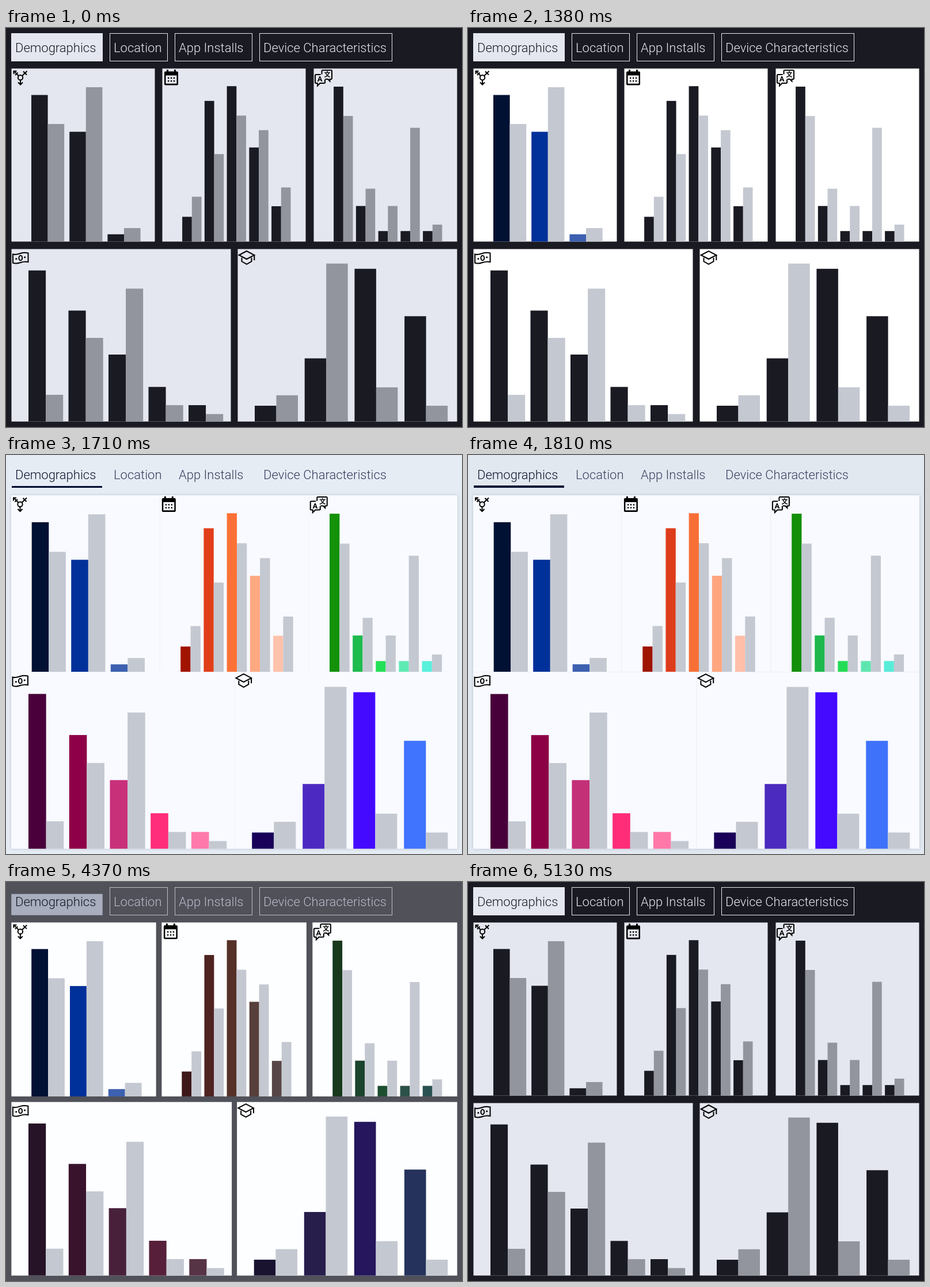
An HTML page with a canvas for the animation above (5.37 s loop, 792 px wide and 694 px high).

```html
<!DOCTYPE html>
<html lang="en">
<head>
<meta charset="utf-8">
<title>Dashboard themes</title>
<style>
  html, body { margin: 0; width: 100%; height: 100%; overflow: hidden; background: #1a1a22; }
  canvas { display: block; }
</style>
</head>
<body>
<canvas id="stage" width="792" height="694"></canvas>
<script>
const ctx = document.getElementById('stage').getContext('2d');
const LOOP = 5370;
const WIRE = 0, DRAFT = 1, FINAL = 2;

// Each change: first visible time, curve start, curve end, from, to
const CHANGES = [
  [170, 170, 590, WIRE, DRAFT],
  [1380, 1380, 1810, DRAFT, FINAL],
  [4180, 4075, 4510, FINAL, DRAFT],
  [4800, 4695, 5130, DRAFT, WIRE],
];

const INK = '#1a1a22', PALE = '#e5e7f0';
const TABS = [
  ['Demographics', 17, 9.5, 158],
  ['Location', 188, 180.5, 100],
  ['App Installs', 301, 293.5, 134],
  ['Device Characteristics', 448, 440.5, 230],
];

// Panel boxes [x, y, w, h] in the dark and light layouts; bars use dark-layout units
const PANELS = [
  { dark: [9.5, 70.5, 249, 301], light: [9, 70, 257.6, 307], icon: drawGender,
    x: 34.5, pitch: 66.2, width: 28.6, early: true,
    bars: [255, 204.5, 191, 268.5, 12.7, 23.5],
    colors: ['#001133', '#003099', '#3d60b0'] },
  { dark: [271.5, 70.5, 249, 301], light: [267.4, 70, 258.2, 307], icon: drawCalendar,
    x: 34.6, pitch: 38.75, width: 16.7,
    bars: [43.1, 78, 244.7, 152.2, 270.3, 219.2, 163.7, 193.8, 61.5, 94.2],
    colors: ['#9e1400', '#dd3d1a', '#f86f36', '#ffa67f', '#ffbfa8'] },
  { dark: [534.5, 70.5, 249, 301], light: [526.4, 70, 257.6, 307], icon: drawLanguage,
    x: 34.6, pitch: 38.75, width: 16.7,
    bars: [269.5, 218.5, 61.9, 92, 18.3, 61.9, 18.3, 197.9, 18.3, 29.5],
    colors: ['#138f0a', '#1eb84c', '#24dc55', '#5fe6b0', '#58ecd8'] },
  { dark: [9.5, 384.5, 381, 300], light: [9, 377.6, 387.6, 307.2], icon: drawMoney,
    x: 29.5, pitch: 69.5, width: 30.1,
    bars: [262.8, 46.5, 193, 145.5, 116.5, 231.2, 60.2, 28.5, 28.5, 13],
    colors: ['#48003a', '#8c0046', '#c43077', '#ff2d78', '#ff78a8'] },
  { dark: [402.5, 384.5, 381, 300], light: [397.4, 377.6, 386.6, 307.2], icon: drawCap,
    x: 29.5, pitch: 86.7, width: 37.5,
    bars: [27.5, 45.7, 109.9, 274.8, 265.7, 59.5, 183.2, 27.5],
    colors: ['#190058', '#4b2abf', '#430aff', '#3f72fa'] },
];

let from = WIRE, to = WIRE, progress = 0;

// Ease in and out with a small pull-back at both ends
function ease(x) {
  if (x <= 0) return 0;
  if (x >= 1) return 1;
  const bezier = (t, a, b) => 3 * (1 - t) ** 2 * t * a + 3 * (1 - t) * t * t * b + t ** 3;
  let lo = 0, hi = 1;
  for (let i = 0; i < 24; i++) {
    const mid = (lo + hi) / 2;
    if (bezier(mid, 1, .4) < x) lo = mid; else hi = mid;
  }
  return bezier(lo, -.4, 1.4);
}

const mix = (...v) => v[from] + (v[to] - v[from]) * progress;
const mixBox = (dark, light) => dark.map((v, i) => mix(v, v, light[i]));
const channel = (hex, i) => parseInt(hex.substr(1 + 2 * i, 2), 16);
const mixColor = (...c) =>
  `rgb(${[0, 1, 2].map(i => Math.round(mix(...c.map(hex => channel(hex, i)))))})`;

function rect(color, x, y, w, h) {
  ctx.fillStyle = color;
  ctx.fillRect(x, y, w, h);
}

function line(d, width = 2) {
  ctx.lineWidth = width;
  ctx.stroke(new Path2D(d));
}

function dot(x, y, r) {
  ctx.beginPath();
  ctx.arc(x, y, r, 0, 7);
  ctx.fill();
}

function drawGender() {
  ctx.beginPath();
  ctx.arc(15.5, 15.8, 4.2, 0, 7);
  ctx.lineWidth = 2;
  ctx.stroke();
  line('M15.5 20V28M11.5 24L15.5 28L19.5 24M12.5 12.8L4.5 4.8M4 9.5V4.5H9M6.5 11.5L11 7M18.5 12.8L27 4.5M20.5 5L26.5 11');
}

function drawCalendar() {
  ctx.fill(new Path2D('M5.5 5H7.5V2H10.5V5H20.5V2H23.5V5H25.5Q27.5 5 27.5 7V27Q27.5 29 25.5 29H5.5Q3.5 29 3.5 27V7Q3.5 5 5.5 5ZM6 12V26.3H25V12Z'), 'evenodd');
  for (let i = 0; i < 6; i++) ctx.fillRect(9.5 + i % 3 * 4.9, i < 3 ? 15.3 : 20.5, 2.4, 2.4);
}

function drawLanguage() {
  line('M12 10.5H4Q2.5 10.5 2.5 12V24Q2.5 25.5 4 25.5H6.5V30L11 25.5H18Q19.5 25.5 19.5 24V19M14 10V4.5Q14 3 15.5 3H30Q31.5 3 31.5 4.5V17Q31.5 18.5 30 18.5H28V22L24.5 18.5H20');
  ctx.font = 'bold 13px Roboto, sans-serif';
  ctx.fillText('A', 6.2, 22.6);
  ctx.font = 'bold 11px "Noto Sans CJK SC", "Noto Sans CJK", sans-serif';
  ctx.fillText('文', 18, 14.6);
}

function drawMoney() {
  line('M2.5 9C7 10.5 11 9 15.5 7.5S25 6 29 7V22.5C24 21.3 20 22 15.5 23.5S6 25.5 2.5 24Z');
  ctx.beginPath();
  ctx.ellipse(15.8, 15.5, 2.9, 4.2, 0, 0, 7);
  ctx.stroke();
  dot(8.3, 17, 1.5);
  dot(23.2, 14.3, 1.5);
}

function drawCap() {
  line('M2.2 10.5L15.5 3.5L28.8 10.5L15.5 17.5ZM28.8 10.5V19.5M7 15V21.5L15.5 26.3L24 21.5V15');
}

function drawTabs() {
  ctx.strokeStyle = PALE;
  ctx.lineWidth = 1;
  ctx.globalAlpha = Math.min(1, Math.max(0, mix(1, 1, 0)));
  for (const [, , x, w] of TABS.slice(1)) ctx.strokeRect(x, 9.5, w, 48);
  ctx.globalAlpha = 1;
  rect(mixColor(PALE, PALE, '#001133'), ...mixBox([9, 9, 159, 49], [10, 53, 157, 4]));
  ctx.font = '300 22px Roboto, sans-serif';
  TABS.forEach(([label, x], i) => {
    ctx.fillStyle = i ? mixColor(PALE, PALE, '#3b4060') : mixColor(INK, INK, '#10132e');
    ctx.fillText(label, x - 1, 42);
  });
}

function drawPanel(panel) {
  const [x, y, w, h] = mixBox(panel.dark, panel.light);
  const sx = w / panel.dark[2], sy = h / panel.dark[3];
  const grey = mixColor('#92959e', '#c4c8d1', '#c4c8d1');
  rect(mixColor(PALE, '#ffffff', '#f8faff'), x, y, w, h);
  panel.bars.forEach((height, i) => {
    const n = i >> 1, color = panel.colors[n];
    const fill = i % 2 ? grey : mixColor(INK, panel.early ? color : INK, color);
    const left = panel.x + n * panel.pitch + i % 2 * panel.width;
    rect(fill, x + left * sx, y + h - height * sy, panel.width * sx, height * sy);
  });
  ctx.save();
  ctx.translate(x, y);
  ctx.fillStyle = ctx.strokeStyle = '#000';
  panel.icon();
  ctx.restore();
}

function draw(now) {
  const t = now % LOOP;
  from = to = WIRE;
  progress = 0;
  for (const [show, start, end, a, b] of CHANGES) {
    if (t < show) break;
    from = a;
    to = b;
    progress = ease((t - start) / (end - start));
  }
  const back = mixColor(INK, INK, '#e2e8f0');
  rect(back, 0, 0, 792, 694);
  ctx.save();
  ctx.shadowColor = `rgba(40, 60, 90, ${Math.min(.3, Math.max(0, mix(0, 0, .22)))})`;
  ctx.shadowBlur = 5;
  rect(back, 9, 70, 775, 615);
  ctx.restore();
  drawTabs();
  PANELS.forEach(drawPanel);
  requestAnimationFrame(tick);
}

const tick = () => draw(performance.now());
tick();
</script>
</body>
</html>
```
